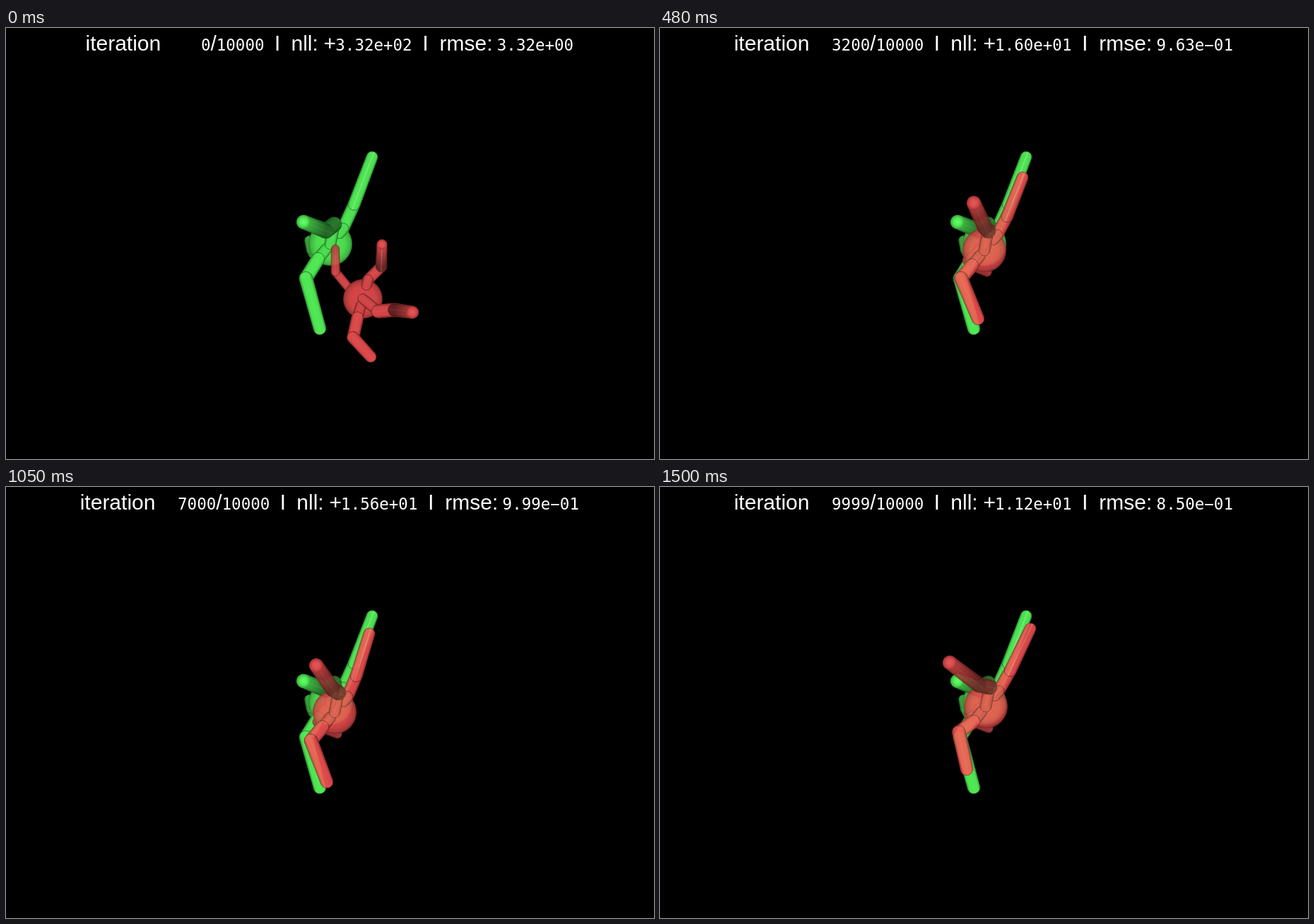
Animation of 917 by 611 pixels, one loop 2.53 s. Source, as an HTML page with a canvas:

```html
<!DOCTYPE html>
<html lang="en">
<head>
<meta charset="utf-8">
<title>Pose fitting</title>
<style>
  html, body { margin: 0; width: 100%; height: 100%; overflow: hidden; background: #000; }
  canvas, svg { position: absolute; left: 0; top: 0; width: 917px; height: 611px; }
  text { fill: #fff; font: 30px "Liberation Sans", Arial, sans-serif; }
  .num { font: 22.5px "DejaVu Sans Mono", monospace; }
  .bar { font-size: 22px; font-weight: bold; text-anchor: middle; }
</style>
</head>
<body>
<canvas id="stage" width="917" height="611"></canvas>
<svg viewBox="0 0 917 611">
  <text id="title" x="112.5" y="31.5">iteration</text>
  <g id="right">
    <text x="365.5" y="31.5" text-anchor="end"><tspan class="num" id="iter">0</tspan>/<tspan class="num">10000</tspan></text>
    <text class="bar" x="384" y="27">|</text>
    <text x="403.5" y="31.5">nll:</text>
    <text x="449.6" y="31.5">+</text>
    <text class="num" id="nll" x="466.3" y="31.5"></text>
    <text class="bar" x="593.5" y="27">|</text>
    <text x="613.5" y="31.5">rmse:</text>
    <text class="num" id="rmse" x="694.8" y="31.5"></text>
  </g>
</svg>
<script>
const $ = id => document.getElementById(id);
const W = 917, H = 611, STEP = 30, LOOP = 2530, LAST = 50;
const ctx = $('stage').getContext('2d');
const layer = document.createElement('canvas');
layer.width = W; layer.height = H;
const layerCtx = layer.getContext('2d');

const GREEN = [78, 230, 82], RED = [255, 84, 85];

// Body centre and, relative to it, the tips of the three visible legs
const pose = (body, a, b, c, d) => ({ body, a, b, c, d });
const key = (step, nll, rmse, ...p) => ({ step, nll, rmse, pose: pose(...p) });
const KEYS = [
  key(0, 332, 3.32, [505, 384], [27, -77], [70, 19], [11, 82]),
  key(6, 24.1, 1.26, [478, 323], [65, -93], [11, -48], [-33, 108]),
  key(16, 16, 0.963, [459, 315], [54, -103], [-15, -67], [-9, 97]),
  key(22, 16.7, 1, [447, 317], [61, -115], [-45, -50], [-37, 109]),
  key(35, 15.6, 0.999, [465, 319], [49, -111], [-26, -66], [-11, 99]),
  key(43, 12, 0.885, [457, 319], [53, -121], [-56, -34], [-21, 112]),
  key(LAST, 11.2, 0.85, [461, 311], [63, -110], [-51, -62], [-27, 89])
];
const TRUTH = pose([459, 306], [59, -123], [-38, -31], [-15, 120], [-30, -5]);

// Hip angle in degrees and knee offset, each before and after settling; limb radius
const LEGS = {
  a: { hip: [-75, -50], knee: [[18, -15], [16, -7]], r: 8.6 },
  b: { hip: [39, -79], knee: [[24, 8], [5, -6]], r: 10.6 },
  c: { hip: [106, 129], knee: [[-17, 22], [-30, 1]], r: 9.5 },
  d: { hip: [219, 150], knee: [[-27, -10], [-18, 10]], r: 6.8 }
};
const HIDDEN_TIP = [[-39, -71], [4, 31]];

const mix = (p, q, k) => p + (q - p) * k;
const mixAll = (p, q, k) => p.map((v, i) => mix(v, q[i], k));
const add = (p, q) => [p[0] + q[0], p[1] + q[1]];
const tone = (rgb, k) => `rgb(${rgb.map(v => Math.round(v * k)).join()})`;

function span(step) {
  const i = Math.max(1, KEYS.findIndex(k => k.step >= step));
  const p = KEYS[i - 1], q = KEYS[i];
  return [p, q, (step - p.step) / (q.step - p.step)];
}

function poseAt(step) {
  const [p, q, k] = span(step), now = {};
  for (const id of ['body', 'a', 'b', 'c']) now[id] = mixAll(p.pose[id], q.pose[id], k);
  now.d = mixAll(...HIDDEN_TIP, Math.min(1, step / 10));
  return now;
}

function stops(fill, list) {
  for (const [at, color] of list) fill.addColorStop(at, color);
  return fill;
}

// Tapered limb: shade along the axis, soft dark sides, light stripe of strength shine
function limb(g, rgb, a, b, ra, rb, ka, kb = ka, shine = 0.06) {
  const dx = b[0] - a[0], dy = b[1] - a[1], len = Math.hypot(dx, dy) || 0.01;
  const dir = Math.atan2(dy, dx);
  const spread = Math.acos(Math.max(-1, Math.min(1, (ra - rb) / len)));
  g.beginPath();
  g.arc(a[0], a[1], ra, dir + spread, dir - spread + Math.PI * 2);
  g.arc(b[0], b[1], rb, dir - spread, dir + spread);
  g.closePath();
  g.fillStyle = stops(g.createLinearGradient(...a, ...b), [[0, tone(rgb, ka)], [1, tone(rgb, kb)]]);
  g.fill();

  const r = Math.max(ra, rb), nx = -dy / len * r, ny = dx / len * r;
  const side = 'rgba(0,0,0,.32)', clear = 'rgba(0,0,0,0)';
  g.fillStyle = stops(g.createLinearGradient(a[0] - nx, a[1] - ny, a[0] + nx, a[1] + ny), [
    [0, side], [0.2, clear], [0.4, 'rgba(255,255,255,0)'], [0.5, `rgba(255,255,255,${shine})`],
    [0.6, 'rgba(255,255,255,0)'], [0.8, clear], [1, side]
  ]);
  g.fill();
  g.strokeStyle = tone(rgb, 0.45);
  g.lineWidth = 0.8;
  g.stroke();
}

function disc(g, [x, y], r, list) {
  g.fillStyle = stops(g.createRadialGradient(x, y, 0, x, y, r), list);
  g.beginPath();
  g.arc(x, y, r, 0, Math.PI * 2);
  g.fill();
}

function ant(g, rgb, p, settled) {
  const size = mix(0.9, 1, settled), legs = {};
  for (const id in LEGS) {
    const spec = LEGS[id], tip = p[id];
    const angle = mix(...spec.hip, settled) * Math.PI / 180;
    // The knee follows the tip part of the way
    const knee = add(mixAll(...spec.knee, settled), [tip[0] * 0.3, tip[1] * 0.4]);
    const reach = Math.hypot(tip[0] - knee[0], tip[1] - knee[1]);
    legs[id] = {
      hip: add(p.body, [28 * Math.cos(angle), 28 * Math.sin(angle)]),
      knee: add(p.body, knee), tip: add(p.body, tip), r: spec.r * size,
      // Short limbs point at the viewer and turn dark
      shade: Math.max(0.42, Math.min(1, reach / 62))
    };
  }
  const { a, b, c, d } = legs;
  const root = (leg, from) => limb(g, rgb, mixAll(p.body, leg.hip, from), leg.hip, 8 * size, 8 * size, 0.95);
  const upper = (leg, k) => limb(g, rgb, leg.hip, leg.knee, leg.r, leg.r, k);
  const lower = (leg, k0, k1, shine) => limb(g, rgb, leg.knee, leg.tip, leg.r, leg.r * 0.93, k0, k1, shine);
  const cap = leg => disc(g, leg.tip, leg.r * 0.93,
    [[0, tone(rgb.map(v => v + 25), 1)], [0.6, tone(rgb, 1)], [1, tone(rgb, 0.72)]]);

  const back = mix(0.95, 0.7, settled);
  upper(d, back);
  lower(d, back, 0.7);
  upper(a, 0.98);
  cap(a);
  lower(a, a.shade, 0.98, 0.25);
  if (a.shade < 0.8) cap(a);
  disc(g, p.body, 31 * size, [[0, tone(rgb, 1)], [0.65, tone(rgb, 0.95)], [0.9, tone(rgb, 0.8)], [1, tone(rgb, 0.55)]]);
  root(a, 0.72);
  root(c, 0.35);
  root(b, 0);
  upper(c, 1);
  lower(c, 1);
  upper(b, mix(0.97, 0.5, settled));
  lower(b, 0.45, 0.85);
  cap(b);
}

function sci(name, step) {
  const [p, q, k] = span(step);
  const v = p[name] * (q[name] / p[name]) ** k;
  return v.toExponential(2).replace(/e([+-])/, 'e$10').replace('-', '\u2212');
}

function label(step) {
  const count = String(Math.min(step * 200, 9999));
  const shift = 2.6 * (count.length - 1);
  $('title').setAttribute('transform', `translate(${-shift})`);
  $('right').setAttribute('transform', `translate(${shift})`);
  $('iter').textContent = count;
  for (const name of ['nll', 'rmse']) $(name).textContent = sci(name, step);
}

function draw(step) {
  ctx.fillStyle = '#000';
  ctx.fillRect(0, 0, W, H);
  ant(ctx, GREEN, TRUTH, 1);
  layerCtx.clearRect(0, 0, W, H);
  ant(layerCtx, RED, poseAt(step), Math.min(1, step / KEYS[1].step));
  ctx.globalAlpha = 0.86;
  ctx.drawImage(layer, 0, 0);
  ctx.globalAlpha = 1;
  label(step);
}

let start = null, shown = 0;
function tick(now) {
  if (start === null) start = now;
  const step = Math.min(LAST, Math.floor(((now - start) % LOOP) / STEP));
  if (step !== shown) draw(shown = step);
  requestAnimationFrame(tick);
}
draw(0);
requestAnimationFrame(tick);
</script>
</body>
</html>
```
